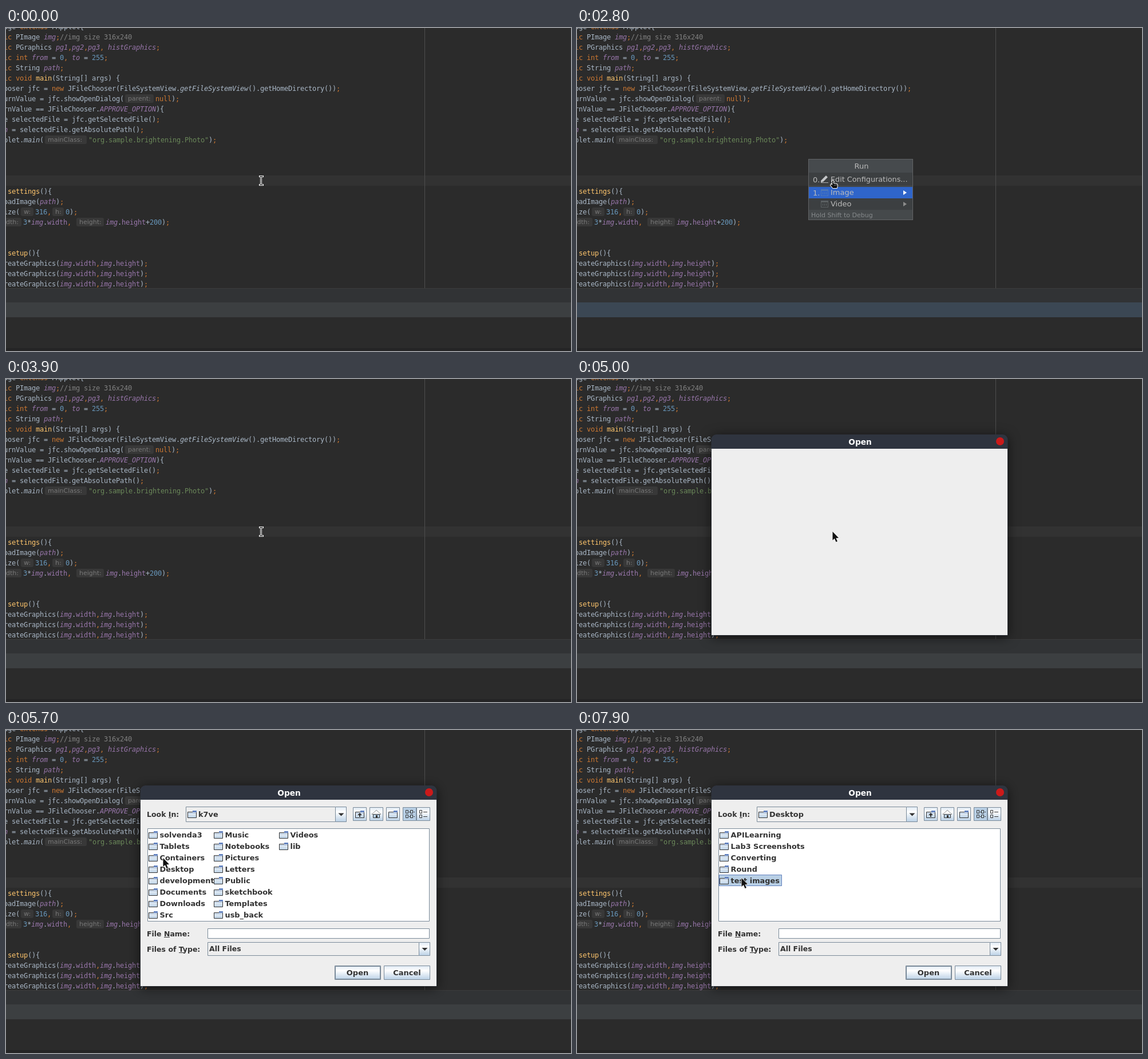
Animation of 987x565 px, one loop 8 s. Source, as an HTML page with a canvas:

```html
<!DOCTYPE html>
<html lang="en">
<head>
<meta charset="utf-8">
<title>Run and open</title>
<style>
html, body { margin: 0; width: 100%; height: 100%; overflow: hidden; background: #2b2b2b; }
canvas { display: block; }
</style>
</head>
<body>
<canvas id="stage" width="987" height="565"></canvas>
<script>
const ctx = document.getElementById('stage').getContext('2d', { alpha: false });
const LOOP = 8000, STEP = 100;
const MONO = '"DejaVu Sans Mono", monospace', SANS = '"DejaVu Sans", sans-serif';

// Code markup: "^" plus a style letter starts a run; "h" is an inlay hint with its advance.
const STYLES = {
  d: '#a9b7c6', i: '#a9b7c6', k: '#cc7832', p: '#9876aa', f: '#9876aa',
  g: '#808080', n: '#6897bb', s: '#6a8759', y: '#ffc66d'
};
const GRAPHICS = '^dreateGraphics(^pimg^d.^fwidth^k,^pimg^d.^fheight^d)^k;';
const CODE = [
  '^dage ^kextends ^dPApplet{',
  '^kic ^dPImage ^pimg^k;^g//img size 316x240',
  '^kic ^dPGraphics ^ppg1^k,^ppg2^k,^ppg3^k, ^phistGraphics^k;',
  '^kic int ^pfrom ^d= ^n0^k, ^pto ^d= ^n255^k;',
  '^kic ^dString ^ppath^k;',
  '^kic void ^ymain^d(String[] args) {',
  '^dooser jfc = ^knew ^dJFileChooser(FileSystemView.^igetFileSystemView^d().getHomeDirectory())^k;',
  '^durnValue = jfc.showOpenDialog(^h55parent:^knull^d)^k;',
  '^drnValue == JFileChooser.^pAPPROVE_OPTION^d){',
  '^de selectedFile = jfc.getSelectedFile()^k;',
  '^ph ^d= selectedFile.getAbsolutePath()^k;',
  '^dplet.^imain^d(^h78mainClass:^s"org.sample.brightening.Photo"^d)^k;',
  '', '', '', '',
  '^d ^ysettings^d(){',
  '^doadImage(^ppath^d)^k;',
  '^dize(^h27w:^n316^k,^h25h:^n0^d)^k;',
  '^h49width:^n3^d*^pimg^d.^fwidth^k, ^h53height:^pimg^d.^fheight^d+^n200^d)^k;',
  '', '',
  '^d ^ysetup^d(){',
  GRAPHICS, GRAPHICS, GRAPHICS
];

const HOME = ['solvenda3', 'Tablets', 'Containers', 'Desktop', 'development', 'Documents',
  'Downloads', 'Src', 'Music', 'Notebooks', 'Pictures', 'Letters', 'Public', 'sketchbook',
  'Templates', 'usb_back', 'Videos', 'lib'];
const DESKTOP = ['APILearning', 'Lab3 Screenshots', 'Converting', 'Round', 'test images'];

// Pointer path: time, x, y
const PATH = [
  [5300, 446, 266], [5700, 274, 223], [5800, 261, 226], [6200, 272, 237], [6800, 272, 237],
  [7100, 291, 258], [7200, 291, 258], [7500, 281, 247], [7700, 287, 258]
];

function rect(x, y, w, h, color) {
  ctx.fillStyle = color;
  ctx.fillRect(x, y, w, h);
}

function frame(x, y, w, h, color) {
  ctx.strokeStyle = color;
  ctx.lineWidth = 1;
  ctx.strokeRect(x + 0.5, y + 0.5, w - 1, h - 1);
}

function text(str, x, y, font, color, align = 'left') {
  ctx.font = font;
  ctx.fillStyle = color;
  ctx.textAlign = align;
  ctx.fillText(str, x, y);
}

function shape(points, fill, stroke, width = 1) {
  ctx.beginPath();
  points.forEach(([x, y]) => ctx.lineTo(x, y));
  ctx.closePath();
  if (stroke) {
    ctx.strokeStyle = stroke;
    ctx.lineWidth = width;
    ctx.lineJoin = 'round';
    ctx.stroke();
  }
  if (fill) {
    ctx.fillStyle = fill;
    ctx.fill();
  }
}

function at(x, y, draw) {
  ctx.save();
  ctx.translate(x, y);
  draw();
  ctx.restore();
}

function codeLine(line, y) {
  let x = line.startsWith('^h') ? -19 : -4;
  for (const run of line.split('^').slice(1)) {
    const style = run[0];
    if (style === 'h') {
      const advance = parseInt(run.slice(1), 10);
      ctx.beginPath();
      ctx.roundRect(x + 2, y - 12, advance - 5, 15, 3);
      ctx.fillStyle = '#383838';
      ctx.fill();
      text(run.slice(3), x + 7, y - 1, '11px ' + SANS, '#787878');
      x += advance;
      continue;
    }
    const font = ('pi'.includes(style) ? 'italic ' : '') + '12px ' + MONO;
    for (const ch of run.slice(1)) {
      text(ch, x, y, font, STYLES[style]);
      x += 7;
    }
  }
}

function editor(barActive) {
  rect(0, 0, 987, 565, '#2b2b2b');
  rect(0, 258, 987, 18, '#323232');
  rect(731, 0, 1, 455, '#4d4d4d');
  CODE.forEach((line, i) => codeLine(line, 2 + 18 * i));
  rect(0, 455, 987, 1, '#3c3c3c');
  rect(0, 456, 987, 24, '#313335');
  rect(0, 480, 987, 26, barActive ? '#3b4754' : '#3c3f41');
  rect(0, 506, 987, 54, '#2b2b2b');
  rect(0, 560, 987, 5, '#242425');
}

function appIcon(x, y, color) {
  frame(x, y, 13, 12, color);
  rect(x, y, 13, 3, color);
  for (let i = 0; i < 3; i++) rect(x + 3 + 3 * i, y + 5, 1, 4, color);
}

function popup(underlined) {
  const font = '13px ' + SANS, ink = '#bbbbbb';
  rect(404, 229, 183, 107, '#3c3f41');
  rect(405, 230, 181, 23, '#464a4d');
  rect(405, 276, 181, 1, '#4c5052');
  rect(405, 278, 181, 20, '#2f65ca');
  rect(405, 318, 181, 17, '#45494b');
  frame(404, 229, 183, 107, '#616365');
  text('Run', 497, 246, font, ink, 'center');
  text('0.', 412, 270, font, ink);
  text('1.', 412, 293, font, ink);
  if (underlined) {
    rect(412, 271, 8, 1, ink);
    rect(412, 294, 8, 1, ink);
  }
  shape([[426, 270], [426, 267], [435, 258], [438, 261], [430, 269]], '#c4c6c8');
  rect(426, 270, 13, 1, '#afb1b3');
  appIcon(426, 282, '#4d78b8');
  appIcon(426, 302, '#5b6062');
  text('Edit Configurations...', 443, 269, '12.8px ' + SANS, ink);
  text('Image', 443, 292, font, ink);
  text('Video', 443, 312, font, ink);
  shape([[570, 284], [576, 288], [570, 292]], '#ffffff');
  shape([[570, 304], [576, 308], [570, 312]], '#8c8c8c');
  text('Hold Shift to Debug', 409, 331, '11px ' + SANS, '#85898b');
}

const BORDER = '#7a8a99', INK = '#333333';
const bold = size => `bold ${size}px ${SANS}`;

function button(x, y, w, h, pressed) {
  const glow = ctx.createLinearGradient(0, y, 0, y + h);
  glow.addColorStop(0, '#dde8f3');
  glow.addColorStop(0.35, '#ffffff');
  glow.addColorStop(1, '#b8cfe5');
  rect(x, y, w, h, pressed ? '#b8cfe5' : glow);
  frame(x, y, w, h, BORDER);
}

function folder(x, y) {
  const fill = ctx.createLinearGradient(0, y, 0, y + 13);
  fill.addColorStop(0, '#ffffff');
  fill.addColorStop(1, '#b8cfe5');
  rect(x, y + 2, 15, 11, fill);
  frame(x, y + 2, 16, 11, INK);
  rect(x + 9, y, 7, 3, '#6382bf');
  rect(x + 1, y + 4, 14, 1, '#9db3d0');
}

function combo(x, y, w, h) {
  rect(x, y, w, h, '#eeeeee');
  frame(x, y, w, h, BORDER);
  button(x + w - 20, y, 20, h);
  const cx = x + w - 9.5, cy = y + h / 2;
  shape([[cx - 5, cy - 2], [cx + 5, cy - 2], [cx, cy + 3]], INK);
}

function label(str, key, x, y) {
  text(str, x, y, bold(12.5), INK);
  const start = ctx.measureText(str.slice(0, key)).width;
  rect(Math.round(x + start), y + 1, Math.round(ctx.measureText(str[key]).width), 1, INK);
}

function toolbar() {
  [606, 635, 664, 693, 717].forEach((x, i) => button(x, 135, 24, 24, i === 3));
  folder(610, 141);
  shape([[618, 145], [622, 149], [619, 149], [619, 152], [617, 152], [617, 149], [614, 149]], INK);
  shape([[639, 147.5], [647, 140.5], [655, 147.5]], '#ffffff', INK);
  rect(641, 147, 12, 7, '#b8cfe5');
  frame(641, 147, 12, 7, INK);
  rect(646, 149, 3, 5, INK);
  folder(668, 141);
  for (let row = 0; row < 2; row++) {
    for (let col = 0; col < 2; col++) {
      frame(698 + 8 * col, 140 + 8 * row, 5, 6, INK);
      rect(704 + 8 * col, 143 + 8 * row, 2, 1, INK);
    }
    frame(722, 140 + 8 * row, 5, 6, INK);
    rect(729, 143 + 8 * row, 7, 1, INK);
  }
}

function fileList(names, selected, focused) {
  names.forEach((name, i) => {
    const x = 248 + 114 * Math.floor(i / 8), y = 173 + 20 * (i % 8);
    const font = bold(12.9);
    ctx.font = font;
    const width = Math.round(ctx.measureText(name).width) + 25;
    if (i === selected) rect(x, y, width, 20, '#b8cfe5');
    if (i === selected || i === focused) frame(x, y, width, 20, '#6382bf');
    folder(x + 1, y + 4);
    text(name, x + 20.5, y + 15, font, INK);
  });
}

function dialogFrame() {
  ctx.save();
  ctx.shadowColor = 'rgba(0,0,0,0.6)';
  ctx.shadowBlur = 20;
  ctx.shadowOffsetY = 3;
  ctx.beginPath();
  ctx.roundRect(234.5, 97, 518, 351.5, [9, 9, 0, 0]);
  ctx.fillStyle = '#2f343f';
  ctx.fill();
  ctx.restore();
  rect(235, 122, 517, 326, '#eeeeee');
  text('Open', 494.5, 115, bold(13.7), '#ffffff', 'center');
  ctx.beginPath();
  ctx.arc(739, 109, 7, 0, 2 * Math.PI);
  ctx.fillStyle = '#cc1a1a';
  ctx.fill();
}

function dialogBody(t) {
  const inDesktop = t >= 6500;
  label('Look In:', 5, 246, 152);
  combo(314, 134, 281, 27);
  folder(317, 141);
  text(inDesktop ? 'Desktop' : 'k7ve', 336, 152, bold(12.9), INK);
  toolbar();

  rect(247, 172, 493, 163, '#ffffff');
  frame(247, 172, 493, 163, BORDER);
  if (inDesktop) fileList(DESKTOP, t >= 7900 ? 4 : -1, t >= 6700 && t < 7900 ? 0 : -1);
  else if (t >= 5200) fileList(HOME, t >= 6300 ? 3 : -1, -1);

  label('File Name:', 5, 246, 361);
  rect(352, 347, 388, 18, '#ffffff');
  frame(352, 347, 388, 18, BORDER);
  const caretOn = t >= 5200 && t < 6300 && Math.floor((t - 5200) / 500) % 2 === 0;
  if (caretOn) rect(355, 349, 1, 15, INK);
  label('Files of Type:', 9, 246, 388);
  combo(352, 371, 389, 24);
  text('All Files', 355, 387, bold(12.5), INK);

  button(574, 412, 81, 25);
  frame(575, 413, 79, 23, BORDER);
  text('Open', 614, 429, bold(13), INK, 'center');
  button(660, 412, 81, 25);
  text('Cancel', 700.5, 429, bold(13), INK, 'center');
}

function beam() {
  const bars = [[443, 259, 6, 1], [443, 274, 6, 1], [445, 260, 1, 14]];
  bars.forEach(([x, y, w, h]) => rect(x - 1, y - 1, w + 2, h + 2, '#ffffff'));
  bars.forEach(([x, y, w, h]) => rect(x, y, w, h, '#111111'));
}

function hand() {
  at(442, 266, () => {
    shape([[4, 1], [6, 1], [6, 6], [12, 7], [13, 9], [12, 14], [5, 14], [1, 9], [2, 7], [4, 9]],
      '#111111', '#ffffff', 2);
    [7, 9, 11].forEach(x => rect(x, 8, 1, 2, '#777777'));
  });
}

function arrow(x, y) {
  at(x + 0.5, y + 1, () => shape(
    [[0, 0], [0, 15], [3.4, 12], [6, 18], [8.4, 17], [5.8, 11.2], [10.5, 11]],
    '#111111', '#f4f4f4', 1.6));
}

function pointerAt(t) {
  const next = PATH.findIndex(p => p[0] > t);
  if (next < 0) return PATH[PATH.length - 1].slice(1);
  if (next === 0) return PATH[0].slice(1);
  const [t0, x0, y0] = PATH[next - 1], [t1, x1, y1] = PATH[next];
  const k = (t - t0) / (t1 - t0);
  return [Math.round(x0 + (x1 - x0) * k), Math.round(y0 + (y1 - y0) * k)];
}

function draw(t) {
  const popupOpen = t >= 1300 && t < 3700;
  editor(t >= 1400 && t < 3900);
  if (popupOpen) popup(t < 2800);
  if (t >= 5000) {
    dialogFrame();
    if (t >= 5100) dialogBody(t);
    arrow(...pointerAt(t));
  } else if (popupOpen) hand();
  else beam();
}

let shown = -1;
function tick() {
  const t = Math.floor(performance.now() % LOOP / STEP) * STEP;
  if (t !== shown) draw(shown = t);
  requestAnimationFrame(tick);
}
tick();
</script>
</body>
</html>
```
